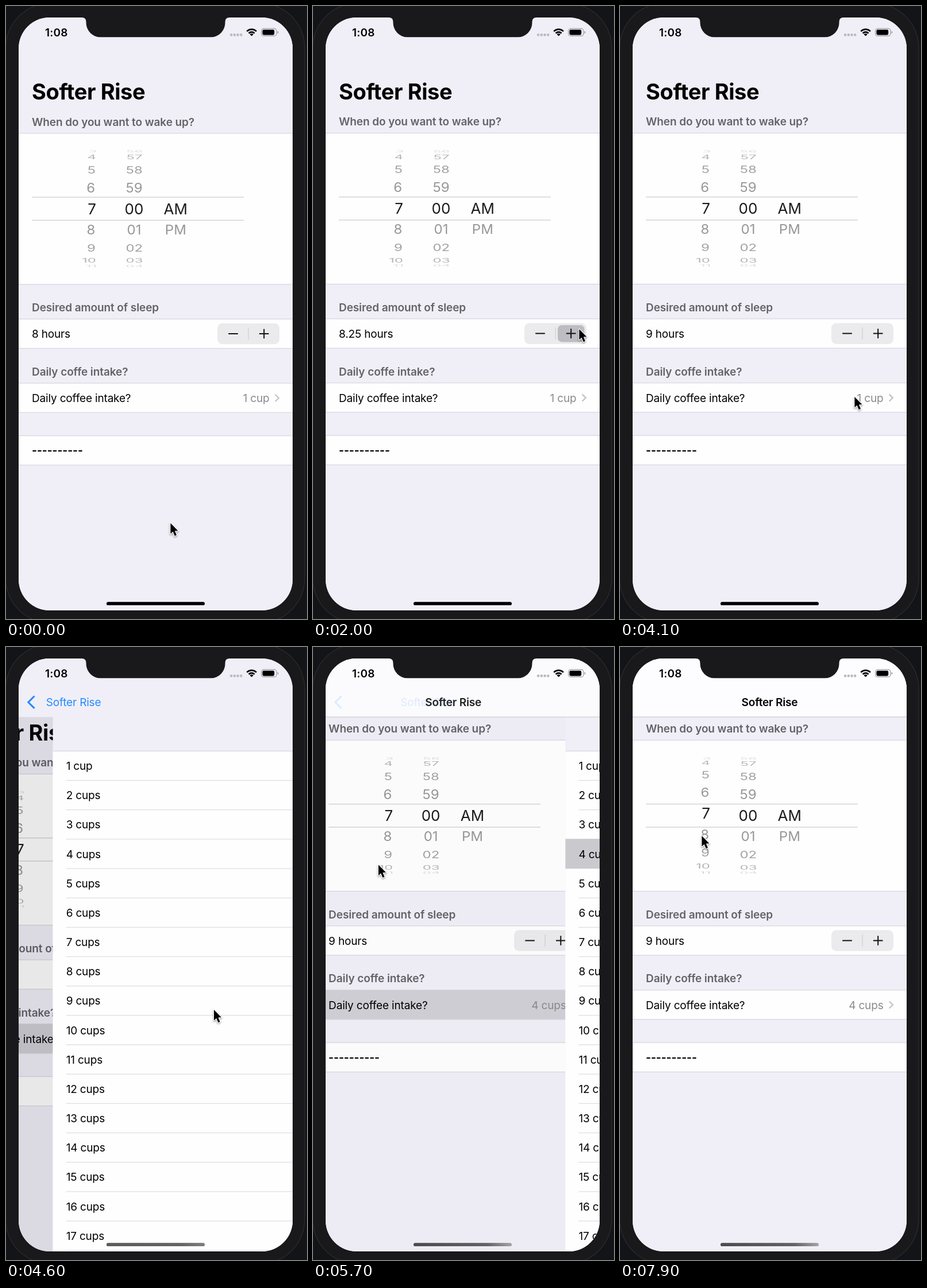
These frames come from a looping animation (524x1068 px, 8000 ms). An HTML page with a canvas:

```html
<!DOCTYPE html>
<html lang="en">
<head>
<meta charset="utf-8">
<title>Sleep planner</title>
<style>
html, body { margin: 0; width: 100%; height: 100%; overflow: hidden; background: #131418; }
canvas { display: block; width: 524px; height: 1068px; }
</style>
</head>
<body>
<canvas id="stage"></canvas>
<script>
const W = 524, H = 1068, LOOP = 8000, STEP = 100;
const L = 22, R = 499, TOP = 20, BOTTOM = 1053, NAV = 122, ROW = 51.17;
const SCREEN = R - L, INSET = 45;
const BG = '#f0eff8', PAPER = '#fefefe', LINE = '#d7d6dc', BLUE = '#0a7aff';
const GRAY = '#8a8a8e', BEZEL = '#19181a';
const APP = 'Softer Rise';
const canvas = document.getElementById('stage');
const ctx = canvas.getContext('2d');
const dpr = window.devicePixelRatio || 1;
canvas.width = W * dpr;
canvas.height = H * dpr;

const clamp = (v, a = 0, b = 1) => Math.min(b, Math.max(a, v));
const smooth = u => u * u * (3 - 2 * u);
const easeOut = u => 1 - Math.pow(1 - u, 3);
const span = (t, a, b) => clamp((t - a) / (b - a));

function rect(x, y, w, h, color) {
  ctx.fillStyle = color;
  ctx.fillRect(x, y, w, h);
}

function round(x, y, w, h, r, color) {
  ctx.beginPath();
  ctx.roundRect(x, y, w, h, r);
  ctx.fillStyle = color;
  ctx.fill();
}

function outline(x, y, w, h, r, color) {
  ctx.beginPath();
  ctx.roundRect(x, y, w, h, r);
  ctx.strokeStyle = color;
  ctx.lineWidth = 1.2;
  ctx.stroke();
}

function poly(color, width, ...points) {
  ctx.beginPath();
  points.forEach(([x, y]) => ctx.lineTo(x, y));
  ctx.strokeStyle = color;
  ctx.lineWidth = width;
  ctx.stroke();
}

// Angle bracket with its tip at (x, y), opening by dx
const chevron = (x, y, dx, dy, color, width) =>
  poly(color, width, [x + dx, y - dy], [x, y], [x + dx, y + dy]);

function text(str, x, y, o = {}) {
  const { size = 19, weight = 400, color = '#000', align = 'left', track = -0.17 } = o;
  ctx.font = `${weight} ${size}px Inter, "Open Sans", sans-serif`;
  ctx.letterSpacing = track + 'px';
  ctx.textAlign = align;
  ctx.fillStyle = color;
  ctx.fillText(str, x, y);
}

function faded(alpha, draw) {
  if (alpha <= 0) return;
  ctx.save();
  ctx.globalAlpha *= alpha;
  draw();
  ctx.restore();
}

function shifted(x, y, draw) {
  ctx.save();
  ctx.translate(x, y);
  draw();
  ctx.restore();
}

function panel(y, h = ROW, color = PAPER) {
  rect(L, y, SCREEN, h, color);
  rect(L, y - 0.6, SCREEN, 1.2, LINE);
  rect(L, y + h - 0.6, SCREEN, 1.2, LINE);
}

// Section heading that sits on a panel starting at y
const header = (str, y) =>
  text(str, INSET, y - 13.2, { weight: 600, color: '#636367', track: -0.09 });

const PRESSES = [2000, 2600, 2900, 3200];

// Pointer trips: where each ends, when, and an optional sideways bow
const TRIPS = [
  { from: 100, to: 300, x: 284, y: 963 },
  { from: 400, to: 900, x: 289, y: 702 },
  { from: 1300, to: 1800, x: 463, y: 562 },
  { from: 3600, to: 4100, x: 408, y: 680 },
  { from: 4400, to: 5200, x: 111, y: 367 },
  { from: 5500, to: 6600, x: 140, y: 500 },
  { from: 6600, to: 7100, x: 158, y: 346, bow: 80 },
  { from: 7200, to: 7900, x: 142, y: 328 }
];

function pointerAt(t) {
  let x = 286, y = 900;
  for (const p of TRIPS) {
    const u = smooth(span(t, p.from, p.to));
    x += (p.x - x) * u + (p.bow || 0) * Math.sin(Math.PI * u);
    y += (p.y - y) * u;
  }
  return { x, y };
}

function stateAt(t) {
  const back = t >= 5400, chosen = t >= 5500;
  const done = PRESSES.filter(p => p <= t);
  const pull = smooth(span(t, 500, 800)) - smooth(span(t, 800, 1200));
  return {
    hours: 8 + done.length / 4,
    glow: done.length ? 1 - span(t, done.at(-1), done.at(-1) + 160) : 0,
    picked: chosen ? 4 : 1,
    cups: chosen ? '4 cups' : '1 cup',
    scroll: back ? 59.5 : 45 * pull + 0.4 * span(t, 1200, 1500),
    push: back ? 1 - easeOut(span(t, 5400, 6000)) : easeOut(span(t, 4300, 4900)),
    rowPress: t < 4300 ? 0 : 1 - span(t, 5700, 6200),
    cellPress: back,
    turn: 0.109 * span(t, 7300, 7900),
    bar: span(t, 4400, 4900),
    pointer: pointerAt(t)
  };
}

// Labels on a drum of radius 100, squashed by their tilt
function wheel(label, x, align, cy, turn = 0, from = -4, to = 4) {
  for (let k = from; k <= to; k++) {
    const a = (k - turn) * 0.3735, c = Math.max(0.07, Math.cos(a));
    const main = Math.abs(k - turn) < 0.5, size = main ? 26 : 24;
    const lean = align === 'right' ? (main ? 2 : (1 - c) * 3.5) : (main ? 0 : 1 - c);
    const color = main ? '#1c1c1e' : `rgba(0,0,0,${0.42 * Math.pow(c, 0.45)})`;
    shifted(x + lean, cy + 100 * Math.sin(a), () => {
      ctx.scale(1, Math.max(0.2, c));
      text(label(k), 0, size * 0.364, { size, color, align, track: 0 });
    });
  }
}

function stepper(y, glow) {
  const m = y + 18.2, minus = 395.5, plus = 449.2, arm = 8.3;
  round(368, y, 108, 36.5, 8.5, '#ebebed');
  rect(421.4, y + 7.5, 1.2, 21, '#cfcfd3');
  faded(glow, () => round(426, y + 3.5, 46.5, 29.5, 7, '#bdbcc2'));
  for (const x of [minus, plus]) poly('#111', 2, [x - arm, m], [x + arm, m]);
  poly('#111', 2, [plus, m - arm], [plus, m + arm]);
}

function formPage(s) {
  rect(L, TOP, SCREEN, BOTTOM - TOP, BG);
  shifted(0, -s.scroll, () => {
    faded(clamp(1 - s.scroll / 32), () =>
      text(APP, INSET, 163, { size: 38, weight: 700, track: -0.4 }));

    const cy = 353.2;
    header('When do you want to wake up?', 221.8);
    panel(221.8, 263.2);
    for (const side of [-1, 1]) rect(INSET, cy + side * 20.1 - 0.6, 369, 1.3, '#cfcfd2');
    wheel(k => String(7 + k), 155, 'right', cy, s.turn);
    wheel(k => String((60 + k) % 60).padStart(2, '0'), 223, 'center', cy);
    wheel(k => k ? 'PM' : 'AM', 295.3, 'center', cy, 0, 0, 1);

    header('Desired amount of sleep', 545.4);
    panel(545.4);
    text(s.hours + ' hours', INSET, 578.2);
    stepper(552.8, s.glow);

    header('Daily coffe intake?', 657.1);
    panel(657.1);
    faded(s.rowPress, () => panel(657.1, ROW, '#d0cfd5'));
    text('Daily coffee intake?', INSET, 690);
    text(s.cups, 458.5, 690, { color: GRAY, align: 'right' });
    chevron(474.9, 683, -6.2, 6, '#c2c2c6', 2.2);

    panel(748.7);
    text('-'.repeat(10), INSET, 781, { weight: 700, track: 0 });
  });
}

function listPage(s) {
  const y0 = 181.3;
  rect(L, NAV, SCREEN, BOTTOM - NAV, BG);
  rect(L, y0, SCREEN, BOTTOM - y0, PAPER);
  rect(L, y0 - 0.6, SCREEN, 1.2, LINE);
  for (let i = 1; i <= 17; i++) {
    const y = y0 + ROW * (i - 1);
    if (i === 4 && s.cellPress) rect(L, y - 0.5, SCREEN, ROW + 0.8, '#cac9ce');
    else rect(INSET, y + ROW - 0.6, R - INSET, 1.2, '#dddce2');
    text(i + (i === 1 ? ' cup' : ' cups'), INSET, y + 32.8);
    if (i === s.picked) poly(BLUE, 2.6, [454, y + 27], [459.5, y + 33], [470, y + 18]);
  }
}

function navBar(s) {
  const p = s.push, own = 1 - p;
  rect(L, TOP, SCREEN, NAV - TOP, BG);
  faded(s.scroll / 70 * own, () => rect(L, TOP, SCREEN, NAV - TOP, '#fff'));
  faded(clamp(s.scroll / 40) * own, () => rect(L, NAV - 0.7, SCREEN, 1.3, '#cdccd2'));
  faded(clamp((s.scroll - 8) / 16.5) * own, () =>
    text(APP, 260.5 - 130 * p, 103, { weight: 600, align: 'center' }));
  faded(p, () => {
    chevron(38.8, 96.2, 10.7, 10.7, BLUE, 3);
    text(APP, 56 + 110 * own, 103, { color: BLUE });
  });
}

function statusBar() {
  text('1:08', 68, 52.5, { size: 19, weight: 600, track: 0.2 });
  for (let i = 0; i < 4; i++) round(390 + i * 5.7, 48, 4.2, 4.4, 1.5, '#bbbac0');
  ctx.strokeStyle = '#000';
  for (let i = 0; i < 3; i++) {
    ctx.beginPath();
    ctx.arc(427.6, 52.5, 2.3 + i * 4.75, -Math.PI * 0.75, -Math.PI * 0.25);
    ctx.lineWidth = i ? 2.7 : 4.2;
    ctx.stroke();
  }
  outline(444.6, 39.4, 26.4, 12.8, 4, '#9b9aa0');
  round(446.4, 41.2, 20.8, 9.2, 2.3, '#000');
  round(472.6, 43.7, 1.8, 4.2, [0, 2, 2, 0], '#9b9aa0');
}

function homeBar(gray) {
  const box = [175, 1038.3, 171, 5.8, 2.9];
  const shade = ctx.createLinearGradient(175, 0, 346, 0);
  shade.addColorStop(0, '#4b4b4d');
  shade.addColorStop(0.75, '#626264');
  shade.addColorStop(1, '#a4a4a6');
  faded(1 - gray, () => round(...box, '#000'));
  faded(gray, () => round(...box, shade));
}

function bezel() {
  const box = [-0.5, -5, 520.5, 1080, 78];
  rect(0, 0, W, H, '#131418');
  round(...box, BEZEL);
  outline(...box, '#2d2c2f');
}

function notch() {
  const a = 139.5, b = 381.5, low = 54.3, r = 25, lip = 7.5;
  ctx.beginPath();
  ctx.moveTo(a - lip, TOP - 1);
  ctx.lineTo(a - lip, TOP);
  ctx.quadraticCurveTo(a, TOP, a, TOP + lip);
  ctx.arcTo(a, low, a + r, low, r);
  ctx.arcTo(b, low, b, low - r, r);
  ctx.lineTo(b, TOP + lip);
  ctx.quadraticCurveTo(b, TOP, b + lip, TOP);
  ctx.lineTo(b + lip, TOP - 1);
  ctx.fillStyle = BEZEL;
  ctx.fill();
}

const ARROW = new Path2D('M0 0V18.6L4.2 14.7L7.4 22.2L10.6 20.8L7.5 13.5L13 13.2Z');

function pointer({ x, y }) {
  shifted(x + 0.4, y + 1, () => {
    ctx.lineJoin = 'round';
    ctx.strokeStyle = '#fff';
    ctx.lineWidth = 2.4;
    ctx.shadowColor = 'rgba(0,0,0,.4)';
    ctx.shadowBlur = 3 * dpr;
    ctx.shadowOffsetY = 1.5 * dpr;
    ctx.stroke(ARROW);
    ctx.shadowColor = 'transparent';
    ctx.fillStyle = '#000';
    ctx.fill(ARROW);
  });
}

function draw(t) {
  const s = stateAt(t);
  ctx.setTransform(dpr, 0, 0, dpr, 0, 0);
  bezel();
  ctx.save();
  ctx.beginPath();
  ctx.roundRect(L, TOP, SCREEN, BOTTOM - TOP, 54);
  ctx.clip();
  rect(L, TOP, SCREEN, BOTTOM - TOP, BG);
  if (s.push < 1) {
    shifted(-0.3 * SCREEN * s.push, 0, () => formPage(s));
    faded(0.1 * s.push, () => rect(L, NAV, SCREEN, BOTTOM - NAV, '#000'));
  }
  if (s.push > 0) shifted(SCREEN * (1 - s.push), 0, () => listPage(s));
  if (s.scroll > 1 || s.push > 0) navBar(s);
  statusBar();
  homeBar(s.bar);
  ctx.restore();
  notch();
  pointer(s.pointer);
}

const start = performance.now();
function tick() {
  const t = (performance.now() - start) % LOOP;
  draw(Math.floor(t / STEP) * STEP);
  requestAnimationFrame(tick);
}
tick();
</script>
</body>
</html>
```
